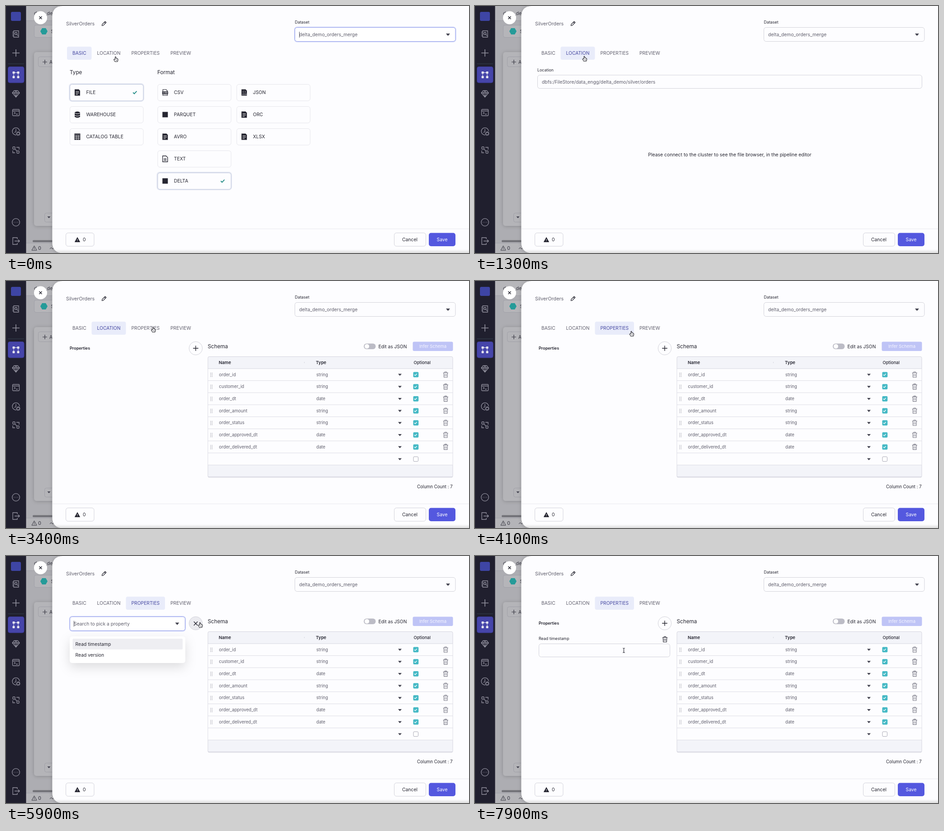
Recreate the animation shown at these times as an HTML page. Size 1025 by 547 pixels, loop 8 s.

```html
<!DOCTYPE html>
<html lang="en">
<head>
<meta charset="utf-8">
<title>Dataset editor</title>
<style>
html, body { margin: 0; height: 100%; overflow: hidden; background: #fdfdff; }
svg { display: block; width: 100vw; height: 100vh; }
text { font-family: Inter, sans-serif; white-space: pre; }
</style>
</head>
<body>
<svg id="stage" viewBox="0 0 1025 547" preserveAspectRatio="none"></svg>
<script>
const INK = '#252530', GREY = '#5f5e6c', LINE = '#dcdce4', ACCENT = '#4447a0';

// Basic shapes; text is placed by the vertical centre of its capitals.
const text = (x, cy, s, size = 10.35, fill = INK, extra = '') =>
  `<text x="${x}" y="${cy + size * .36}" font-size="${size}" fill="${fill}" ${extra}>${s}</text>`;
const rect = (x, y, w, h, r, fill, stroke = 'none', extra = '') =>
  `<rect x="${x}" y="${y}" width="${w}" height="${h}" rx="${r}" fill="${fill}" stroke="${stroke}" ${extra}/>`;
const circle = (x, y, r, fill, stroke = 'none', extra = '') =>
  `<circle cx="${x}" cy="${y}" r="${r}" fill="${fill}" stroke="${stroke}" ${extra}/>`;
const line = (d, stroke, width = 1, extra = '') =>
  `<path d="${d}" fill="none" stroke="${stroke}" stroke-width="${width}" ${extra}/>`;
const solid = (d, fill = INK) => `<path d="${d}" fill="${fill}"/>`;
const at = (x, y, body) => `<g transform="translate(${x} ${y})">${body}</g>`;
const layer = (id, body) => `<g id="${id}">${body}</g>`;
const arrow = (x, y, s = 4.5) =>
  solid(`M${x - s} ${y - s * .55}h${2 * s}l${-s} ${s * 1.15}z`, '#42424f');
const plus = (x, y, s, color, w = 1.4) =>
  line(`M${x - s} ${y}h${2 * s}M${x} ${y - s}v${2 * s}`, color, w);
const cross = (x, y, s, color, w = 1.4) =>
  line(`M${x - s} ${y - s}l${2 * s} ${2 * s}m0 ${-2 * s}l${-2 * s} ${2 * s}`, color, w);
const tick = (x, y, s, color, w) =>
  line(`M${x - s} ${y}l${s * .65} ${s * .65}l${s * 1.25} ${-s * 1.3}`, color, w);
const warning = (x, y, fill, stroke, mark) =>
  `<path d="M${x} ${y - 5}l5.5 10h-11z" fill="${fill}" stroke="${stroke}" stroke-linejoin="round"/>` +
  line(`M${x} ${y - 1.5}v3m0 1v1`, mark);
const trash = (x, y, color) => at(x, y, line(
  'M-5.5 -4H5.5M-2 -4V-6H2V-4M-4.3 -4L-3.7 6H3.7L4.3 -4M-1.5 -1.5V3.5M1.5 -1.5V3.5', color, 1.1));
const focusBox = (x, y, w, h) =>
  rect(x, y, w, h, 5, '#fff', '#dde2fc', 'stroke-width="4"') + rect(x, y, w, h, 5, '#fff', '#8a96e8');

function backdrop() {
  const g = '#92919f', edge = '#a0a0a8', dark = '#34343f';
  const icon = (y, body) => at(22, y, `<g fill="none" stroke="${g}" stroke-width="1.3">${body}</g>`);
  return rect(0, 0, 110, 547, 0, '#adadb2') +
    rect(44, 0, 80, 32, 0, '#b6b6ba') + line('M44 32.5H130', edge) +
    text(62, 16, 'delta_demo', 10.3, dark) +
    rect(62.5, 42.5, 70, 27, 4, '#b5b5b9', edge) +
    solid('M76 56l4-7h8l4 7-4 7h-8z', '#259b99') + text(99.5, 56, 'S', 10.3, dark) +
    rect(62, 102, 90, 385, 6, '#b4b4b8', 'none', 'filter="url(#soft)"') +
    rect(71.5, 112.5, 60, 22, 4, '#b4b4b8', edge) + plus(86, 124, 5, dark, 1.2) + text(96, 124, 'A', 10.3, dark) +
    rect(85.5, 458.5, 60, 20, 4, '#b4b4b8', edge) + arrow(95, 468, 3.5) +
    rect(59, 518.5, 80, 4.5, 2, '#727278') +
    rect(44, 525, 80, 22, 0, '#b4b4b8') + line('M44 525H130', edge) +
    warning(62.5, 536, 'none', dark, dark) + text(71, 536, '0', 11, dark) +
    line('M97 538l3-3 3 3 3-2', dark) +
    rect(0, 0, 44.5, 547, 0, '#201f2e') +
    rect(11, 13, 22, 20, 3, '#3e45a5') +
    line('M4 128H40', '#34404e') + rect(4.5, 134.5, 35.5, 35.5, 4, '#4645aa', '#3b3a92') +
    icon(62, '<path d="M-5 -7H6V7H-5zM-8 -4H-5M-8 0H-5M-8 4H-5"/><circle cx="0" cy="-1" r="2.5"/><path d="M2 1l3 3"/>') +
    plus(22, 104, 8, g, 1.6) +
    at(22, 152.5, [[-5, -5], [5, -5], [-5, 5], [5, 5]].map(([x, y]) =>
      rect(x - 2.5, y - 2.5, 5, 5, 1.2, '#e6e6f0')).join('') +
      line('M-3 -5H3M-5 -2V3M5 -2V3', '#e6e6f0', 1)) +
    icon(194.5, '<path d="M-8 -2L-4 -7H4L8 -2L0 7.5zM-8 -2H8M-3 -2L0 7L3 -2L0 -7z"/>') +
    icon(236, '<rect x="-7.5" y="-7" width="15" height="14" rx="1.5"/><path d="M-7 -3.5H7M-4 -1L-1.5 1L-4 3M0 3.5H4"/>') +
    icon(277.5, '<path d="M1 8A8 8 0 1 1 8 0M0 -5V0L-3 3"/><circle cx="5" cy="5" r="3"/><path stroke-dasharray="1.5 1.7" d="M5 .8A4.2 4.2 0 1 1 4.9 .8"/>') +
    icon(319, '<rect x="-7" y="-7" width="5" height="5" rx="1"/><rect x="2" y="2" width="5" height="5" rx="1"/><path d="M1 -6H7V-1M-7 1V6H-2M-2 -2L2 2"/>') +
    icon(479, `<circle r="8.3"/>${[-4, 0, 4].map(x => circle(x, 0, .7, g)).join('')}`) +
    icon(520.5, '<path d="M3 -4V-7.5H-7V7.5H3V4M-3 0H8M5 -3L8 0L5 3"/>');
}

function dialog() {
  const panel = 'M1025 0H126.5Q102.5 0 102.5 24V523Q102.5 547 126.5 547H1025z';
  return `<path d="${panel}" fill="#fdfdff" filter="url(#soft)"/>` + solid(panel, 'url(#base)') +
    circle(76.5, 26, 14.5, '#fff') + cross(76.5, 26, 3, INK, 1.5) +
    text(133, 39, 'SilverOrders', 10.8, GREY) +
    at(217, 39, line('M-4.5 4.5L-4 1.5L2.5 -4.8L4.8 -2.5L-1.5 4zM.8 -3L3 -.8', INK, 1.2)) +
    text(639.5, 36, 'Dataset', 8.9) +
    layer('datasetIdle', rect(639.5, 47.5, 355.5, 31, 5, '#fdfdff', '#d2d2da')) +
    layer('datasetFocus', focusBox(639.5, 47.5, 355.5, 31) + line('M649.5 57V70', INK, .8)) +
    text(649, 63.5, 'delta_demo_orders_merge', 10.35, GREY) + arrow(978.5, 63.5) +
    line('M103 493.5H1025', '#e9e9ee') +
    rect(132.5, 502.5, 62.5, 29.5, 5, '#fdfdff', '#d2d2da') +
    warning(158, 517.5, INK, INK, '#fff') + text(170, 517.5, '0') +
    rect(859.5, 502.5, 70, 29.5, 5, '#fdfdff', '#d2d2da') + text(877, 517.5, 'Cancel') +
    rect(936, 502.5, 59, 29.5, 5, '#5458df') + text(953.5, 517.5, 'Save', 10.35, '#fff');
}

const tabs = [['BASIC', 135, 54.5], ['LOCATION', 189.5, 76], ['PROPERTIES', 265.5, 86.5], ['PREVIEW', 352, 69]];
const tabBar = () => tabs.map(([name, x, w], i) =>
  rect(x, 90, w, 29, 4, '#e9ecfa', 'none', `id="pill${i}"`) +
  text(x + 12, 104.5, name, 10.3, GREY, `id="tab${i}"`)).join('');

const sheet = 'M-6 -7H3L6 -4V7H-6z';
const icons = {
  file: solid(sheet) + line('M-3.5 -2H3.5M-3.5 1H3.5M-3.5 4H1', '#fff'),
  outline: line('M-5.5 -6.5H2L5.5 -3V6.5H-5.5zM-3 0H3M-3 3H3', INK, 1.3),
  store: solid('M-6 -5Q0 -9 6 -5V5Q0 9 -6 5z') + line('M-6 -3.5Q0 0 6 -3.5M-6 1.5Q0 5 6 1.5', '#fff'),
  grid: rect(-6.5, -7, 13, 14, 0, INK) + line('M-6 -3.5H6M-6 0H6M-6 3.5H6M-2.2 -3V7M2.2 -3V7', '#fff', .8),
  csv: line('M-5 -2V-6.5H2L5 -3.5V-2M-5 4V6.5H5V4', INK, 1.2) + rect(-6.5, -2.5, 13, 6.5, 1, INK) +
    text(-5, .8, 'CSV', 4.9, '#fff', 'font-weight="700"'),
  json: solid(sheet) + text(-3.6, -1.5, '{ }', 6, '#fff') + text(-5.4, 4, 'JSON', 4, '#fff'),
  plain: rect(-6, -6, 12, 12, 0, INK)
};

function option(x, y, name, icon, selected) {
  return (selected ? rect(x, y, 163, 37, 5, 'none', '#e6e9f3', 'stroke-width="4"') : '') +
    rect(x + .5, y + .5, 162.5, 36.5, 5, '#fdfdff', selected ? '#bcc4db' : '#e6e6eb') +
    at(x + 17, y + 18.5, icons[icon]) + text(x + 36.5, y + 18.5, name) +
    (selected ? tick(x + 144.5, y + 18.5, 4.3, '#268e88', 1.9) : '');
}

function basicPage() {
  const column = (x, items) => items.map(([name, icon, selected], i) =>
    option(x, 173 + 49 * i, name, icon, selected)).join('');
  return text(141, 146.5, 'Type', 11.7) + text(335, 146.5, 'Format', 11.7) +
    column(141, [['FILE', 'file', true], ['WAREHOUSE', 'store'], ['CATALOG TABLE', 'grid']]) +
    column(335.3, [['CSV', 'csv'], ['PARQUET', 'plain'], ['AVRO', 'file'], ['TEXT', 'outline'], ['DELTA', 'plain', true]]) +
    column(510.3, [['JSON', 'json'], ['ORC', 'file'], ['XLSX', 'file']]);
}

const locationPage = () => text(138, 141.5, 'Location', 8.9) +
  rect(138.5, 153, 851, 29.5, 5, '#fdfdff', '#d2d2da') +
  text(148, 168, 'dbfs:/FileStore/data_engg/delta_demo/silver/orders', 10.35, GREY) +
  text(564, 329, 'Please connect to the cluster to see the file browser, in the pipeline editor', 10.43, INK, 'text-anchor="middle"');

const fields = [['order_id', 'string'], ['customer_id', 'string'], ['order_dt', 'date'], ['order_amount', 'string'],
  ['order_status', 'string'], ['order_approved_dt', 'date'], ['order_delivered_dt', 'date'], null];

function schemaRow(field, i) {
  const y = 207.2 + 26.7 * i;
  let row = line(`M447 ${y + 13.4}H989`, LINE) + arrow(872, y + .5, 4);
  if (!field) return row + rect(902, y - 5, 10.5, 10.5, 2, '#fff', '#a8a8b4');
  for (let dot = 0; dot < 8; dot++)
    row += rect(452.5 + dot % 2 * 3.2, y - 4 + (dot >> 1) * 2.6, 1.2, 1.2, 0, '#8b8b96');
  return row + text(471.5, y, field[0], 9.65, GREY) + text(687, y, field[1], 9.65, GREY) +
    rect(901.5, y - 5.7, 11.8, 11.8, 2, '#45b9c5') + tick(907, y + .2, 3, '#fff', 1.3) +
    trash(973.3, y, '#777784');
}

function propertiesPage() {
  const bold = 'font-weight="600"';
  return layer('listTitle', text(141, 149, 'Properties', 9, INK, bold)) +
    circle(420, 149, 14.7, '#fdfdff', '#d2d2da', 'id="addButton"') +
    layer('addIcon', plus(420, 149, 5.8, INK)) + layer('closeIcon', cross(420, 149.5, 4.2, INK)) +
    layer('picker',
      rect(141, 178, 256, 59, 6, '#fff', 'none', 'filter="url(#drop)"') +
      focusBox(141.5, 134.5, 255, 31) + line('M150.5 143.5V156.5', INK, .8) +
      text(150, 150, 'Search to pick a property', 10.35, GREY) + arrow(379, 150) +
      rect(147.5, 183, 243.5, 24, 2, '#eeeef2') +
      text(153.5, 195, 'Read timestamp') + text(153.5, 219, 'Read version')) +
    layer('timestampField', text(141, 183, 'Read timestamp', 8.9) + trash(420.5, 184.5, INK) +
      rect(141.5, 194.5, 290, 29, 5, '#fdfdff', '#d2d2da')) +
    text(446.5, 145, 'Schema', 11.75) +
    rect(792, 138.5, 26.5, 12.5, 6.2, '#bcbcc6') + circle(799, 144.7, 5, '#fff') +
    text(824.5, 145, 'Edit as JSON', 10.2) +
    rect(900.5, 134.5, 89, 20.5, 3, '#bfc4f6') + text(945, 145, 'Infer Schema', 9.6, '#f6f6ff', 'text-anchor="middle"') +
    rect(447, 167.5, 542, 267.5, 3, '#f3f4f9', '#d5d5df') + rect(447.5, 194, 541, 213, 0, '#fdfdff') +
    line('M447 194H989M448 433.5H988', '#d5d5df') +
    text(471, 181, 'Name', 9.6, INK, bold) + text(686, 181, 'Type', 9.6, INK, bold) +
    text(902.5, 181, 'Optional', 9.4, INK, 'font-weight="500"') + line('M660.5 179V182', '#d5d5df') +
    fields.map(schemaRow).join('') + text(910, 455.5, 'Column Count : 7', 9.65);
}

const pointers = layer('hand', `<path d="M-1 1V-4.4Q0 -6 1 -4.4V-1.7Q2.3 -2.4 2.7 -1.1Q4 -1.7 4.3 -.4Q5.4 -.6 5.4 1V2.6Q5 4.2 4.2 5.8H-1.2Q-2.2 3.9 -4 1.3Q-3.3 -.6 -1 1z"
    transform="translate(-.5 .5)" fill="#fff" stroke="#222229" stroke-width="1.1" stroke-linejoin="round"/>` +
    line('M.7 2V4.5M2.5 2V4.5', INK, .7)) +
  layer('beam', line('M-2.3 -5Q0 -5 0 -3.5V3.5Q0 5 -2.3 5M2.3 -5Q0 -5 0 -3.5M0 3.5Q0 5 2.3 5', INK, 1.1));

const stage = document.getElementById('stage');
stage.innerHTML = `<defs>
  <filter id="soft" x="-30%" y="-5%" width="160%" height="110%"><feDropShadow dx="0" dy="1" stdDeviation="4" flood-opacity=".2"/></filter>
  <filter id="drop" x="-30%" y="-60%" width="160%" height="320%"><feDropShadow dx="0" dy="9" stdDeviation="12" flood-opacity=".13"/></filter>
  <linearGradient id="base" x1="0" y1="0" x2="0" y2="1"><stop offset=".985" stop-color="#ddd" stop-opacity="0"/><stop offset="1" stop-color="#ddd"/></linearGradient>
  </defs>` + backdrop() + dialog() + tabBar() + layer('basic', basicPage()) +
  layer('location', locationPage()) + layer('properties', propertiesPage()) + layer('pointer', pointers);

const el = id => document.getElementById(id);
const show = (id, on) => el(id).setAttribute('display', on ? 'inline' : 'none');

// Pointer stops: time, x, y.
const path = [[0, 243, 117], [900, 242.5, 116], [1600, 242.5, 116], [2400, 326, 107], [3900, 326, 107],
  [4600, 430, 152], [6000, 430, 152], [6700, 329, 203], [7200, 329, 203], [7600, 329.5, 209], [8000, 329.5, 209]];

function pointerAt(t) {
  const i = path.findIndex(stop => stop[0] > t), [t0, x0, y0] = path[i - 1], [t1, x1, y1] = path[i];
  const u = (t - t0) / (t1 - t0), e = u * u * (3 - 2 * u);
  return [x0 + (x1 - x0) * e, y0 + (y1 - y0) * e];
}

function draw(now) {
  const t = Math.floor(now % 8000 / 100) * 100;
  const [x, y] = pointerAt(t);
  const picking = t >= 5500 && t < 7200, chosen = t >= 7200;
  const activeTab = t < 700 ? 0 : t < 3500 ? 1 : 2;

  tabs.forEach((_, i) => {
    show('pill' + i, i === activeTab);
    el('tab' + i).setAttribute('fill', i === activeTab ? ACCENT : GREY);
  });
  show('datasetFocus', t < 600);
  show('datasetIdle', t >= 600);
  show('basic', t < 600);
  show('location', t >= 600 && t < 3300);
  show('properties', t >= 3300);
  show('listTitle', !picking);
  show('addIcon', !picking);
  show('closeIcon', picking);
  show('picker', picking);
  show('timestampField', chosen);
  const hovered = Math.hypot(x - 420, y - 149) < 15;
  el('addButton').setAttribute('fill', hovered ? '#ebebf0' : '#fdfdff');
  show('hand', !chosen);
  show('beam', chosen);
  el('pointer').setAttribute('transform', `translate(${x} ${y})`);
  requestAnimationFrame(() => draw(performance.now()));
}
draw(0);
</script>
</body>
</html>
```
